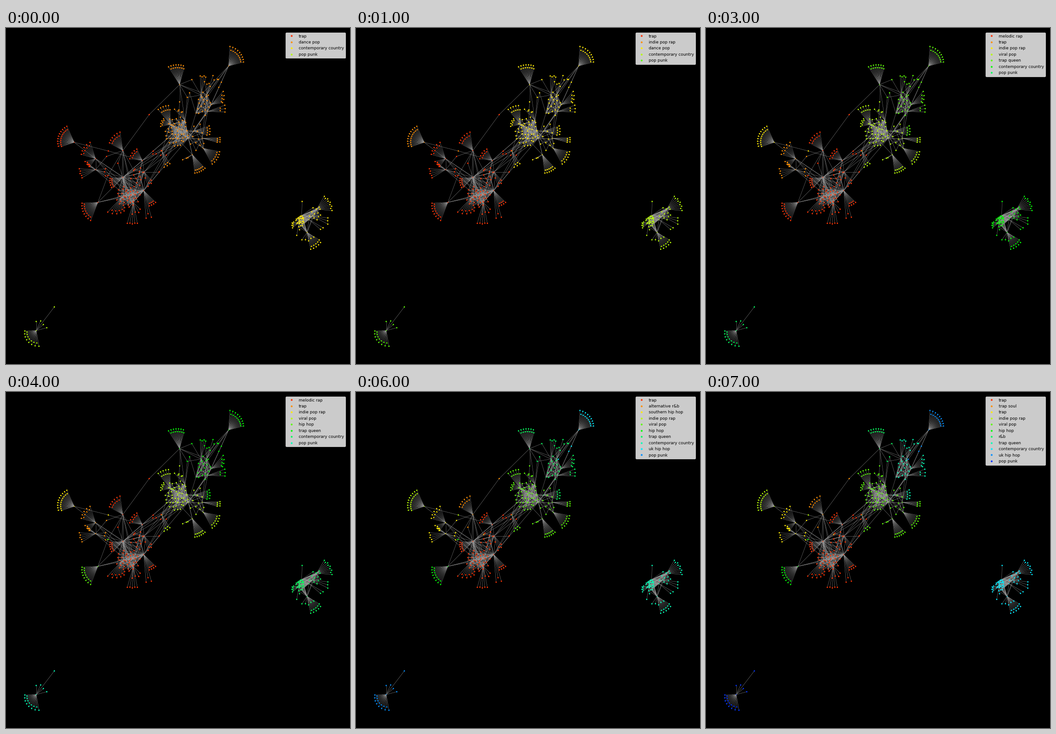
Recreate the animation shown at these times as a matplotlib script. Size 758 by 739 pixels, loop 8 s.

```python
import random
from itertools import combinations, product
from math import cos, sin, sqrt, radians

import numpy as np
import matplotlib.pyplot as plt
from matplotlib.animation import FuncAnimation
from matplotlib.collections import LineCollection
from matplotlib.colors import hsv_to_rgb
from matplotlib.lines import Line2D

W, H = 758, 739
FONT = 8.9
GOLDEN = radians(137.5)
rng = random.Random(4)
nodes = {}
hubs = set()
edges = []

# Communities in legend order; each one leaves its parent at a given step.
ORDER = ["melodic", "soul", "southern", "indie", "viral", "hiphop",
         "rnb", "queen", "country", "uk", "punk"]
SPLITS = {"indie": ("melodic", 1), "queen": ("viral", 2),
          "southern": ("melodic", 3), "hiphop": ("melodic", 4),
          "uk": ("queen", 5), "soul": ("melodic", 6), "rnb": ("queen", 7)}
TAIL = ["contemporary country", "pop punk"]
UK_TAIL = ["contemporary country", "uk hip hop", "pop punk"]
MIDDLE = ["indie pop rap", "viral pop", "hip hop"]
LABELS = [
    ["trap", "dance pop"] + TAIL,
    ["trap", "indie pop rap", "dance pop"] + TAIL,
    ["trap", "indie pop rap", "viral pop", "trap queen"] + TAIL,
    ["melodic rap", "trap", "indie pop rap", "viral pop", "trap queen"] + TAIL,
    ["melodic rap", "trap"] + MIDDLE + ["trap queen"] + TAIL,
    ["melodic rap", "trap"] + MIDDLE + ["trap queen"] + UK_TAIL,
    ["trap", "alternative r&b", "southern hip hop"] + MIDDLE
    + ["trap queen"] + UK_TAIL,
    ["trap", "trap soul", "trap"] + MIDDLE + ["r&b", "trap queen"] + UK_TAIL,
]


def star(hub, points):
    edges.extend((hub, p) for p in points)


def add_hubs(group, *points):
    for p in points:
        nodes[p] = group
        hubs.add(p)
    edges.extend(combinations(points, 2))
    return points


def fan(group, hub, n, r0, r1, a0, a1, depth=0.85):
    """Leaves zigzag between two rings while the angle sweeps a0 to a1."""
    for i, t in enumerate(np.linspace(0, 1, n)):
        r = (r0 + (r1 - r0) * t) * (depth if i % 2 else 1)
        a = radians(a0 + (a1 - a0) * t)
        p = (hub[0] + r * cos(a), hub[1] + r * sin(a))
        nodes[p] = group
        edges.append((hub, p))


def cloud(group, x, y, rx, ry, n, ties, k=3):
    """Leaves shared by k random hubs, spread evenly over an ellipse."""
    for i in range(n):
        r = sqrt((i + 0.5) / n)
        a = i * GOLDEN
        p = (x + rx * r * cos(a) + rng.uniform(-2, 2),
             y + ry * r * sin(a) + rng.uniform(-2, 2))
        nodes[p] = group
        star(p, rng.sample(ties, min(k, len(ties))))


def via(group, p, *ends):
    nodes[p] = group
    star(p, ends)


def bridge(group, p, q, t):
    """A node on the way from p to q."""
    via(group, (p[0] + (q[0] - p[0]) * t, p[1] + (q[1] - p[1]) * t), p, q)


# Hubs
UK, = add_hubs("uk", (490, 83))
RNB, = add_hubs("rnb", (382, 124))
IND, = add_hubs("indie", (150, 251))
SOUL, = add_hubs("soul", (257, 269))
HIP, = add_hubs("hiphop", (202, 383))
PUNK, = add_hubs("punk", (66, 665))
S1, S2 = add_hubs("southern", (197, 287), (197, 311))
Q = Q1, Q2, Q3, Q4, Q5 = add_hubs(
    "queen", (429, 147), (442, 146), (418, 187), (452, 168), (444, 183))
Q6, = add_hubs("queen", (413, 226))
V = V1, V2, V3, V4, V5, V6 = add_hubs(
    "viral", (362, 212), (379, 222), (398, 226), (394, 203), (377, 243),
    (401, 242))
V7, = add_hubs("viral", (343, 270))
V8, = add_hubs("viral", (410, 278))
V9, V10 = add_hubs("viral", (434, 264), (432, 242))
M1, M2, M3 = add_hubs("melodic", (300, 291), (257, 328), (304, 316))
M = M4, M5, M6, M7 = add_hubs(
    "melodic", (303, 357), (281, 364), (253, 373), (280, 383))
C = C1, C2, C3, C4, C5, C6 = add_hubs(
    "country", (684, 398), (663, 449), (645, 428), (651, 412), (675, 413),
    (667, 421))

# Upper right
fan("uk", UK, 17, 43, 34, -86, -15, 0.82)
fan("rnb", RNB, 14, 46, 42, -122, -75, 0.86)
fan("queen", Q1, 4, 42, 43, -92, -75, 0.95)
fan("queen", Q2, 4, 29, 23, -100, -68)
fan("queen", Q2, 3, 44, 41, -72, -55)
fan("queen", Q4, 7, 39, 25, -48, -10)
fan("queen", Q5, 5, 40, 38, -20, 2, 0.72)
fan("queen", Q6, 8, 36, 36, -18, 17)
cloud("queen", 435, 168, 17, 27, 16, Q)

# Upper centre
fan("viral", V1, 10, 43, 42, -129, -92, 0.78)
fan("viral", V1, 7, 20, 22, -140, -190)
fan("viral", V4, 5, 34, 20, -133, -107)
fan("viral", V7, 5, 36, 33, 82, 58)
fan("viral", V8, 11, 41, 41, 82, 47)
fan("viral", V8, 3, 24, 12, 152, 145)
fan("viral", V9, 11, 40, 37, 60, 12)
fan("viral", V10, 6, 39, 40, -2, 15)
cloud("viral", 375, 228, 27, 34, 46, V)
cloud("viral", 421, 242, 16, 36, 11, [V3, V6, V9, V10], 2)

# Left side
fan("indie", IND, 20, 39, 36, -115, -198, 0.82)
fan("southern", S1, 9, 33, 38, -163, -109)
fan("southern", S1, 5, 24, 21, 165, 128)
fan("southern", S2, 5, 24, 16, 220, 205)
fan("southern", S2, 5, 36, 35, 183, 149, 0.95)
fan("southern", S2, 3, 22, 26, -5, 32)
fan("soul", SOUL, 11, 34, 41, -150, -99, 0.82)
fan("hiphop", HIP, 15, 35, 43, 177, 112)
fan("melodic", M1, 9, 28, 28, 188, 244, 0.82)
fan("melodic", M2, 10, 28, 34, 176, 134)
fan("melodic", M3, 4, 33, 28, 75, 50)
fan("melodic", M4, 7, 37, 36, 45, 70)
fan("melodic", M4, 3, 61, 61, 85, 74)
fan("melodic", M7, 5, 48, 47, 106, 79, 0.97)
fan("melodic", M7, 4, 26, 25, 95, 45)
fan("melodic", M6, 10, 43, 28, 133, 70, 0.82)
cloud("melodic", 291, 325, 17, 20, 12, [M2, M3, M4], 2)
cloud("melodic", 268, 370, 26, 25, 36, (M2,) + M)

# Right side
fan("country", C1, 9, 33, 34, -59, 5, 0.92)
fan("country", C5, 3, 34, 38, 7, 28, 0.97)
fan("country", C6, 2, 36, 37, 30, 40, 0.9)
fan("country", C2, 10, 38, 37, 78, 32)
fan("country", C2, 5, 18, 20, 35, 125)
fan("country", C3, 6, 18, 14, 142, 188)
fan("country", C3, 2, 28, 18, 100, 85)
cloud("country", 682, 406, 15, 17, 12, [C1, C4, C5])
cloud("country", 648, 423, 10, 13, 28, C)
via("country", (652, 381), C4)

# Lower left
fan("punk", PUNK, 15, 25, 35, 178, 80, 0.8)
fan("punk", PUNK, 4, 20, 21, -90, -15, 1.15)
via("punk", (106, 613), PUNK)

# Ties between clusters
bridge("uk", UK, Q4, 0.42)
bridge("uk", UK, Q5, 0.47)
bridge("uk", UK, Q3, 0.62)
bridge("queen", UK, Q2, 0.47)
star(UK, [Q1])
via("rnb", (409, 113), RNB, Q1)
via("rnb", (399, 152), RNB, Q1, V4)
via("rnb", (404, 142), Q3, V4)
via("viral", (382, 162), RNB, V2)
star(RNB, [Q1, Q2, V4])
star(Q6, [V2, V3, V6, Q4, Q5])
star(V6, [Q3, Q4, Q5, V8, V9, V10])
star(V10, [Q2, Q5])
star(V7, [V1, V2, V5])
star(V8, [V3, V5])
for (p, q), t in zip(product([V2, V5, V6], [M1, M3, M4]),
                     np.tile([0.7, 0.5, 0.3], 3)):
    if t > 0.4:
        bridge("melodic", p, q, t)
    else:
        star(p, [q, M2])
via("melodic", (337, 316), M3, V5, M4)
via("soul", (315, 190), SOUL, RNB)
via("soul", (246, 297), SOUL, M2)
via("soul", (281, 313), SOUL, M3)
via("indie", (225, 270), IND, M1)
via("southern", (221, 282), S2, SOUL)
via("hiphop", (224, 324), HIP, SOUL)
star(IND, [S1])
for hub in (S1, S2, SOUL, HIP, M1, M3):
    star(hub, (M2, M5) + tuple(rng.sample(M, 2)))


def community(group, step):
    while group in SPLITS and SPLITS[group][1] > step:
        group = SPLITS[group][0]
    return group


def hue(i):
    return hsv_to_rgb(((12 + 21.6 * i) / 360, 1, 1))


fig = plt.figure(figsize=(W / 72, H / 72), dpi=72, facecolor="black")
ax = fig.add_axes([0, 0, 1, 1])
ax.set_xlim(0, W)
ax.set_ylim(H, 0)
ax.axis("off")

xy = np.array(list(nodes)) + 0.5
sizes = [4 if p in hubs else 8.5 for p in nodes]
dots = ax.scatter(xy[:, 0], xy[:, 1], s=sizes, linewidths=0, zorder=2)
ax.add_collection(LineCollection(np.array(edges) + 0.5, colors="#999999",
                                 linewidths=0.5, zorder=1))


def draw(step):
    active = [g for g in ORDER if community(g, step) == g]
    shade = {g: hue(active.index(community(g, step))) for g in ORDER}
    dots.set_facecolor([shade[g] for g in nodes.values()])
    handles = [Line2D([], [], ls="", marker="o", ms=4, mew=0, color=hue(i))
               for i in range(len(active))]
    legend = ax.legend(handles, LABELS[step], loc="upper right",
                       fontsize=FONT, borderaxespad=0, numpoints=1,
                       bbox_to_anchor=(748 / W, 1 - 10 / H))
    legend.set_zorder(5)
    return [dots, legend]


anim = FuncAnimation(fig, draw, frames=8, init_func=lambda: draw(0),
                     interval=1000, repeat=True, repeat_delay=0, blit=False)
plt.show()
```
